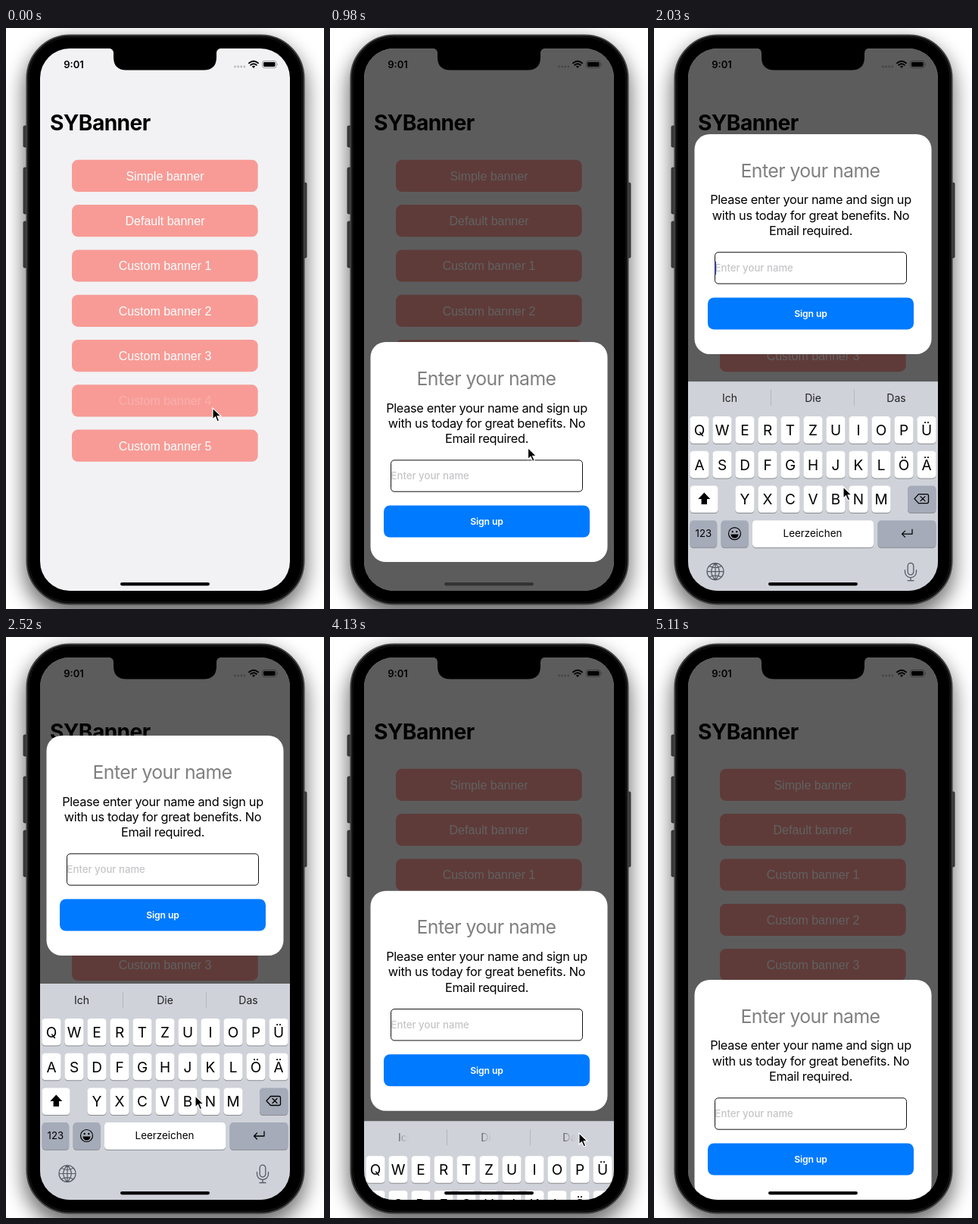
An HTML page that plays this animation: 420x766 px, repeating every 5250 ms.

```html
<!DOCTYPE html>
<html lang="en">
<head>
<meta charset="utf-8">
<title>Banner demo</title>
<style>
html, body { margin: 0; width: 100%; height: 100%; overflow: hidden; background: #fff; }
svg { display: block; width: 420px; height: 766px; font-family: Inter, Roboto, sans-serif; }
.mid { text-anchor: middle; }
.list { font: 16px "Liberation Sans", Arial, sans-serif; fill: #fff; }
.line { fill: none; stroke: #000; stroke-linecap: round; stroke-linejoin: round; }
</style>
</head>
<body>
<svg viewBox="0 0 420 766">
  <defs>
    <clipPath id="screen"><rect x="45" y="27" width="330" height="715" rx="39"/></clipPath>
    <filter id="blur" x="-30%" y="-20%" width="160%" height="140%"><feGaussianBlur stdDeviation="13"/></filter>
    <linearGradient id="wipe" gradientUnits="objectBoundingBox">
      <stop offset="0" stop-color="#222"/><stop offset=".3" stop-color="#222" stop-opacity=".35"/>
      <stop offset=".7" stop-color="#222" stop-opacity="0"/>
    </linearGradient>
  </defs>

  <!-- phone body -->
  <rect x="23" y="16" width="374" height="762" rx="66" opacity=".55" filter="url(#blur)"/>
  <g fill="#3b3b3d" stroke="#1d1d1f" stroke-width=".7">
    <rect x="23" y="129" width="6" height="28" rx="1.5"/>
    <rect x="23" y="184" width="6" height="61" rx="1.5"/>
    <rect x="23" y="255" width="6" height="61" rx="1.5"/>
    <rect x="391" y="204" width="6" height="99" rx="1.5"/>
  </g>
  <rect x="27.5" y="9.5" width="366" height="750" rx="57" stroke="#3f3f41" stroke-width="2"/>
  <rect x="30" y="12" width="361" height="745" rx="54.5" stroke="#1c1c1e"/>

  <g clip-path="url(#screen)">
    <rect x="45" y="27" width="330" height="715" fill="#f2f2f5"/>
    <text x="58" y="134.5" font-size="28.2" font-weight="700" letter-spacing="-.6">SYBanner</text>
    <g id="list"></g>
    <g>
      <text class="mid" x="89.5" y="53" font-size="13" font-weight="600">9:01</text>
      <path d="M302.5 51h.01m4.1 0h.01m4.1 0h.01m4.1 0h.01" class="line" stroke-width="2.8" style="stroke:#b9b9bc"/>
      <path d="M321 46.3q6-5.2 12 0M323.2 48.8q3.8-3.3 7.6 0" class="line" stroke-width="1.9" stroke-linecap="butt"/>
      <path d="M327 53l-2.2-2.5q2.2-1.7 4.4 0z"/>
      <rect x="338.5" y="43.5" width="18.5" height="9" rx="2.6" fill="none" stroke="#000" stroke-opacity=".4" stroke-width=".9"/>
      <rect x="340" y="45" width="15.5" height="6" rx="1.4"/>
      <path d="M358 46.4q1.6 1.6 0 3.2z" opacity=".5"/>
    </g>
    <rect id="dim" x="45" y="27" width="330" height="715"/>
    <g id="keys"></g>
    <g id="card">
      <rect x="53.5" width="313" height="290" rx="20" fill="#fff"/>
      <g class="mid">
        <text x="206.5" y="56.7" font-size="24.8" letter-spacing="-.55" fill="#808080">Enter your name</text>
        <g font-size="16.3" letter-spacing="-.3">
          <text x="207" y="92.5">Please enter your name and sign up</text>
          <text x="207" y="112.7">with us today for great benefits. No</text>
          <text x="207" y="132.9">Email required.</text>
        </g>
      </g>
      <rect x="80.5" y="155.8" width="253" height="41.4" rx="4.5" fill="#fff" stroke="#111"/>
      <text x="80.5" y="181.3" font-size="13.2" font-weight="500" fill="#c5c5c8">Enter your name</text>
      <rect id="caret" x="80.5" y="168" width="1.6" height="17.5" fill="#3d4fb5"/>
      <rect x="71" y="215.5" width="272" height="42" rx="8" fill="#007aff"/>
      <text class="mid" x="207" y="241" font-size="12.2" font-weight="600" letter-spacing="-.1" fill="#fff">Sign up</text>
    </g>
    <rect id="home" x="151" y="731" width="118" height="4.2" rx="2.1"/>
  </g>
  <path d="M135 26.5q7 .5 7 7v5q0 17 17 17h102q17 0 17-17v-5q0-6.500 7-7z"/>
  <path id="cursor" d="M0 0v15l3.500-3.200 2.600 6 2.600-1.100-2.600-5.900h4.900z" stroke="#fff" stroke-width="1.100"/>
</svg>

<script>
const $ = id => document.getElementById(id);
const LOOP = 5250, STEP = 70;
const CARD_REST = 414, CARD_UP = 130, CARD_LOW = 452, KEYS_OFF = 742, KEYS_UP = 457;

const label = (s, x, y, size, extra = '') =>
  `<text class="mid" x="${x}" y="${y}" font-size="${size}" ${extra}>${s}</text>`;
const box = (x, y, w, h, r, fill, extra = '') =>
  `<rect x="${x}" y="${y}" width="${w}" height="${h}" rx="${r}" fill="${fill}" ${extra}/>`;

const names = ['Simple banner', 'Default banner', ...[1, 2, 3, 4, 5].map(n => 'Custom banner ' + n)];
$('list').innerHTML = names.map((name, i) => {
  const y = 173.8 + 59.3 * i;
  return box(87, y, 245.7, 42.2, 8, '#f89b96') +
    `<text class="mid list" x="210" y="${y + 27}" id="item${i}">${name}</text>`;
}).join('');

// Keyboard, with its top edge at y = 0
const WHITE = '#fff', GREY = '#a5abb8';
const rowY = r => 46 + 45.7 * r;
const key = (x, r, w, fill, extra) =>
  box(x, rowY(r) + 1, w, 35.6, 4.5, '#898b90') + box(x, rowY(r), w, 35.6, 4.5, fill, extra);
const letters = (s, r, x0) => [...s].map((c, i) =>
  key(x0 + 30 * i - 12.6, r, 25.2, WHITE) + label(c, x0 + 30 * i, rowY(r) + 25, 19)).join('');
const icon = (d, width = 1.3, extra = '') => `<path class="line" d="${d}" stroke-width="${width}" ${extra}/>`;

$('keys').innerHTML =
  box(45, 0, 330, 290, 0, '#cfd2d9') +
  `<g id="hints">${['Ich', 'Die', 'Das'].map((s, i) => label(s, 100 + 110 * i, 27, 14)).join('')}</g>` +
  box(154, 11, 1, 21, 0, '#b3b6bd') + box(264, 11, 1, 21, 0, '#b3b6bd') +
  letters('QWERTZUIOPÜ', 0, 60) + letters('ASDFGHJKLÖÄ', 1, 60) + letters('YXCVBNM', 2, 120) +
  key(47.6, 2, 37, WHITE) + key(335, 2, 37.4, GREY) +
  key(47.6, 3, 35.6, GREY) + key(88.6, 3, 36, GREY) + key(130, 3, 160, WHITE) +
  key(295.6, 3, 76.8, GREY, 'id="enter"') +
  label('123', 65.4, 205, 13.2) + label('Leerzeichen', 209.5, 204.500, 13.4) +
  '<path d="M66.3 146.500l8 8.500h-4.300v7h-7.400v-7h-4.300z"/>' +
  icon('M349.500 148.500h11q2 0 2 2v8q0 2-2 2h-11l-5.500-6zM352 151.500l6 6m0-6l-6 6') +
  icon('M341 195v6h-13.500m4-4l-4 4 4 4') +
  '<circle class="line" cx="106.5" cy="200.5" r="8" stroke-width="1.2"/>' +
  '<path d="M101.500 201.500h10q-.5 5-5 5t-5-5z"/><circle cx="103.7" cy="198" r="1.2"/><circle cx="109.3" cy="198" r="1.2"/>' +
  `<g style="--c:#555b64">${
    icon('M70 250.500a11 11 0 1 0 22 0a11 11 0 1 0-22 0zM81 239.500v22M70 250.500h22M81 239.500q-10.500 11 0 22q10.500-11 0-22M73 243.300q8 4 16 0M73 257.700q8-4 16 0', 1.2, 'style="stroke:#555b64"')}${
    icon('M335.200 243a3.800 3.800 0 0 1 7.600 0v8a3.800 3.800 0 0 1-7.600 0zM331.500 248.500v2.500a7.500 7.500 0 0 0 15 0v-2.500M339 258.500v4m-4 0h8', 1.3, 'style="stroke:#555b64"')}</g>`;

const clamp = v => Math.min(1, Math.max(0, v));
const mix = (a, b, p) => a + (b - a) * p;
const ease = p => p * p * (3 - 2 * p);
const ramp = (t, from, to) => ease(clamp((t - from) / (to - from)));
// Critically damped spring, as used for the keyboard
const spring = (t, from) => {
  const x = Math.max(0, t - from) * 0.01743;
  return 1 - (1 + x) * Math.exp(-x);
};

// Pointer stops: time, x, y
const stops = [[0, 273, 501], [700, 273, 501], [1260, 250, 606], [1800, 250, 605], [2830, 250, 605],
  [2960, 336, 650], [3400, 329, 654], [4200, 329, 654], [4520, 380, 772], [LOOP, 380, 772]];

function pointer(t) {
  const i = stops.findIndex(s => s[0] > t);
  const [a, b] = [stops[i - 1], stops[i]];
  const p = ramp(t, a[0], b[0]);
  return [mix(a[1], b[1], p), mix(a[2], b[2], p)];
}

const move = (id, x, y) => $(id).setAttribute('transform', `translate(${x} ${y})`);
const set = (id, name, value) => $(id).setAttribute(name, value);

function draw(t) {
  const shown = ramp(t, 30, 340), leave = spring(t, 4006);
  const raised = mix(mix(KEYS_OFF, CARD_REST, shown), CARD_UP, spring(t, 1733));
  move('card', 0, mix(raised, CARD_LOW, leave));
  move('keys', 0, mix(mix(KEYS_OFF, KEYS_UP, spring(t, 1727)), KEYS_OFF, leave));
  move('cursor', ...pointer(t));
  set('dim', 'opacity', 0.62 * shown);
  set('item5', 'opacity', mix(0.2, 1, ramp(t, 30, 300)));
  set('caret', 'opacity', t >= 1700 && t < 4000 && (t - 1700) % 1000 < 500 ? 1 : 0);
  set('hints', 'fill', t < 4060 ? '#222' : 'url(#wipe)');
  set('hints', 'opacity', 1 - ramp(t, 4060, 4270));
  set('enter', 'fill', t >= 3710 && t < 3900 ? WHITE : GREY);
  set('home', 'fill', t >= 140 && t < 1750 ? '#333' : '#000');
}

const start = performance.now();
function tick() {
  const t = (performance.now() - start) % LOOP;
  draw(Math.floor(t / STEP) * STEP);
  requestAnimationFrame(tick);
}
tick();
</script>
</body>
</html>
```
